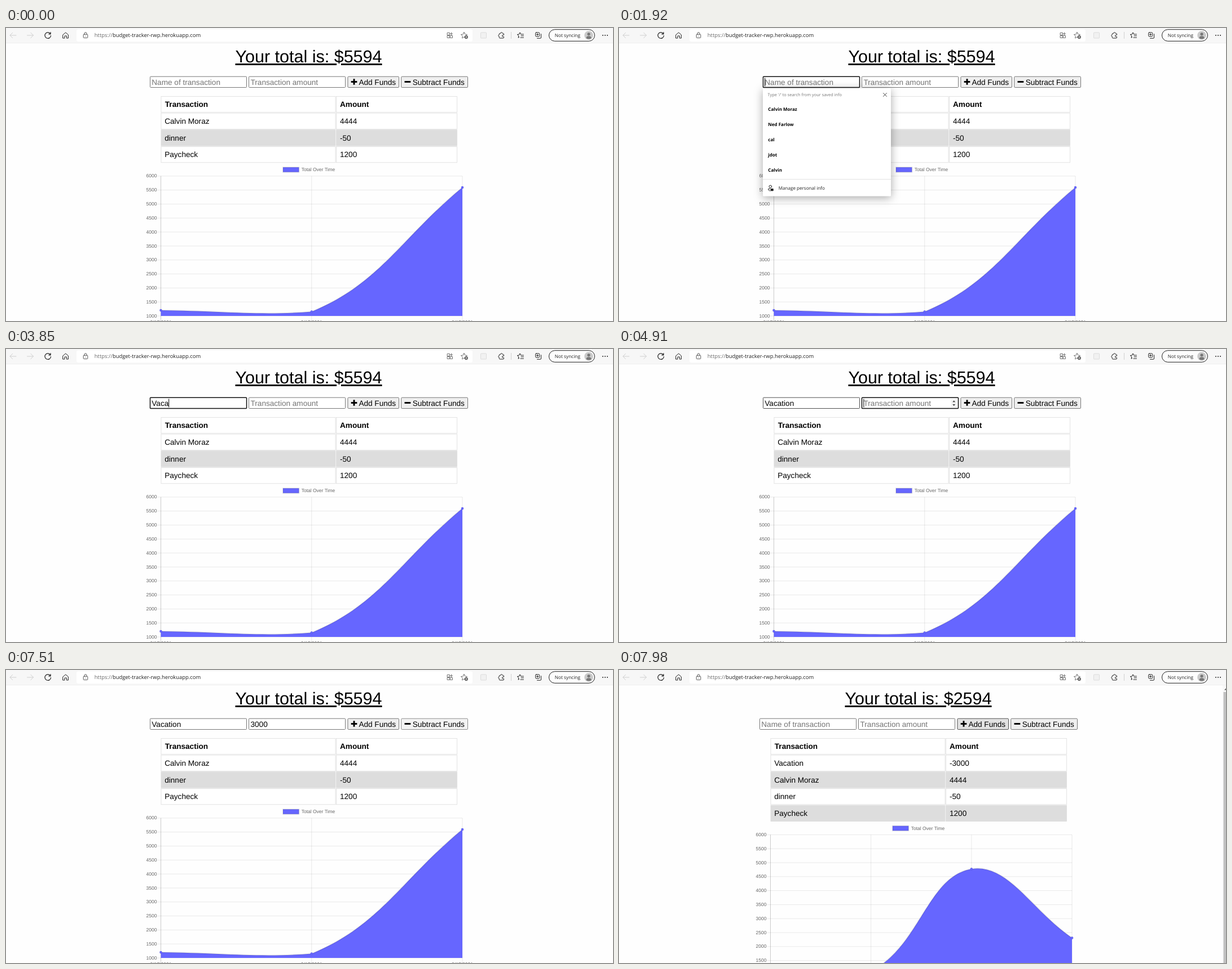
An HTML page for the animation above (8 s loop, 1076 px wide and 520 px high).

```html
<!DOCTYPE html>
<html lang="en">
<head>
<meta charset="utf-8">
<title>Budget tracker</title>
<style>
  html, body { margin: 0; width: 100%; height: 100%; overflow: hidden; background: #fefefe; }
  body { text-rendering: geometricPrecision; }
  svg { position: absolute; left: 0; top: 0; display: block; }
  text { font: 13.6px "Liberation Sans", Arial, sans-serif; white-space: pre; }
  h1 {
    position: absolute; left: 406.5px; top: 32.5px; margin: 0; white-space: nowrap;
    font: 30.5px/36px "Liberation Sans", Arial, sans-serif; text-decoration: underline;
  }
  .bold { font-weight: bold; }
  .ui text, .ui { font-family: "Open Sans", "Noto Sans", sans-serif; }
  .url { font-size: 9.41px; }
  .sync { font-size: 8.3px; }
  .tick { font-size: 8.5px; fill: #666; }
  .line { fill: none; stroke: #222; stroke-width: 1; stroke-linecap: round; stroke-linejoin: round; }
  .faint { stroke: #cfcfcf; }
  .grid { stroke: #000; stroke-opacity: .11; stroke-width: .8; }
  .grid.axis { stroke-opacity: .25; }
  .cell { fill: #fff; fill-opacity: .4; stroke: #ddd; stroke-width: .8; }
  .cell.even { fill: #ddd; fill-opacity: 1; }
  .area { fill: #66f; }
  .curve { fill: none; stroke: #000; stroke-opacity: .1; stroke-width: 2; }
  .dot { fill: #66f; stroke: #000; stroke-opacity: .1; stroke-width: .7; }
  .field rect { fill: #fff; stroke: #767676; stroke-width: 1; }
  .field.hover rect { stroke: #4f4f4f; }
  .field.focus rect { stroke: #101010; stroke-width: 1.5; }
  .field.empty text { fill: #757575; }
  .button rect { fill: #efefef; stroke: #767676; stroke-width: 1; }
  .button.hover rect { fill: #e2e2e2; stroke: #4f4f4f; }
  .button.active rect { fill: #f3f3f3; stroke: #8d8d8d; }
  #popup { transform-origin: 368.5px 199px; }
  #popup .panel { fill: #fff; filter: drop-shadow(0 3px 8px rgba(0, 0, 0, .34)); }
  #popup .hint { font-size: 7.4px; fill: #767676; }
  #popup .item { font-size: 8px; }
  #popup .manage { font-size: 8.08px; fill: #222; }
</style>
</head>
<body>
<svg id="stage" width="1076" height="520" viewBox="0 0 1076 520">
  <g id="before"></g>
  <g id="after" transform="translate(-6 0)"></g>

  <g id="form">
    <g id="name" class="field">
      <rect x="255.5" y="86.2" width="171" height="19.3" rx="1"/>
      <text x="258.3" y="101"></text>
    </g>
    <g id="amount" class="field">
      <rect x="430.5" y="86.2" width="171" height="19.3" rx="1"/>
      <text x="433.5" y="101"></text>
      <g id="spinner">
        <rect x="588.5" y="88.5" width="10.5" height="15" style="fill:#f3f3f3;stroke:none"/>
        <path d="M591.2 94.2h5l-2.5-3zM591.2 98h5l-2.5 3z" fill="#444"/>
      </g>
    </g>
    <g id="add" class="button">
      <rect x="605.9" y="86.2" width="90.6" height="19.3" rx="1.5"/>
      <path d="M617 90.3v10.4M611.7 95.5h10.6" stroke="#000" stroke-width="2.9"/>
      <text x="625.4" y="101">Add Funds</text>
    </g>
    <g id="subtract" class="button">
      <rect x="700.7" y="86.2" width="117.8" height="19.3" rx="1.5"/>
      <path d="M706.5 95.5h10.8" stroke="#000" stroke-width="2.9"/>
      <text x="720.7" y="101">Subtract Funds</text>
    </g>
    <path id="caret" stroke="#000" stroke-width="1"/>
  </g>

  <g id="popup" class="ui">
    <rect class="panel" x="255" y="107" width="227" height="191.5" rx="1.5"/>
    <text class="hint" x="263.6" y="121.3">Type '/' to search from your saved info</text>
    <path class="line" d="M468.6 115.6l5.8 5.8m0-5.8l-5.8 5.8" style="stroke-width:.9"/>
    <g id="items"></g>
    <path d="M255 268.5h227" stroke="#e2e2e2"/>
    <g class="line">
      <circle cx="268.3" cy="281.4" r="2.3"/>
      <path d="M268 285.4h-3.3q-.4 3.6 3.6 3.6"/>
    </g>
    <rect x="268.8" y="285" width="5" height="4.2" rx=".8" fill="#222"/>
    <text class="manage" x="282.8" y="287.2">Manage personal info</text>
  </g>

  <g id="scrollbar">
    <path d="M1070 27h6v493h-6z" fill="#f8f8f8"/>
    <path d="M1071.5 39h4.5v481h-4.5z" fill="#c1c1c1"/>
    <path d="M1073 35.5l3-3v3z" fill="#555"/>
  </g>

  <g id="toolbar" class="ui">
    <path d="M0 0h1076v27H0z" fill="#f7f7f7"/>
    <path d="M0 26.7h1076" stroke="#ebebeb" stroke-width=".6"/>
    <rect x="125" y="2.5" width="702" height="21.5" rx="3" fill="#fff"/>
    <path class="line faint" d="M18 13H7m4.6-4.6L7 13l4.6 4.6M37.5 13h11m-4.6-4.6l4.6 4.6l-4.6 4.6"/>
    <path class="line" d="M78.7 10.3A5.3 5.3 0 1 0 79.5 13.5M79 7.6v3.2h-3.2" style="stroke-width:1.2"/>
    <path class="line" d="M101 12l4.7-4l4.7 4v6h-3v-4h-3.4v4h-3z"/>
    <g class="line" style="stroke:#555">
      <rect x="137.2" y="11.3" width="7.6" height="6.2" rx="1"/>
      <path d="M139 11.3v-1.5a2 2 0 0 1 4 0v1.5M141 14.2v.4"/>
    </g>
    <text class="url" x="156.8" y="16.4" fill="#222"><tspan fill="#6b6b6b">https://</tspan>budget-tracker-rwp.herokuapp.com</text>
    <g class="line" style="stroke:#666;stroke-width:.9">
      <path d="M782.5 8.5h4v4h-4zM782.5 13.5h4v4h-4zM787.5 13.5h4v4h-4zM789.5 8v4.5m-2.2-2.25h4.4"/>
      <path d="M812 7.5l1.6 3.5l3.9.5l-2.9 2.6l.7 3.9l-3.3-1.9l-3.4 1.9l.7-3.9l-2.9-2.6l3.9-.5z"/>
    </g>
    <circle cx="815.8" cy="16" r="3.1" fill="#555"/>
    <path d="M815.8 14.3v3.4m-1.7-1.7h3.4" stroke="#fff" stroke-width=".8"/>
    <rect x="841.5" y="8" width="10" height="10" rx="1" fill="#f1f1f1" stroke="#dcdcdc"/>
    <path class="line" d="M875.5 9.5h1.2a1.7 1.7 0 0 1 3.4 0h1.2q1.2 0 1.2 1.2v1.6h-1.4a1.6 1.6 0 0 0 0 3.2h1.4v1.3q0 1.2-1.2 1.2h-5.800q-1.200 0-1.200-1.200v-1.800a1.500 1.500 0 0 1 0-3v-1.300q0-1.200 1.200-1.200z"/>
    <path d="M895.5 7v12" stroke="#d0d0d0"/>
    <path class="line" d="M909.8 16l-1.7 1.3l.6-3.6l-2.5-2.2l3.4-.4l1.5-3.2l1.5 3.2h4.9M913.2 13.8h4.3M912 17h5.5"/>
    <g class="line">
      <rect x="938.7" y="8" width="7" height="7" rx="1.2"/>
      <path d="M948.5 10.7v6.3q0 1.3-1.3 1.3h-5.7M942.2 9.8v3.4m-1.7-1.7h3.4"/>
    </g>
    <rect x="962.5" y="2.7" width="81" height="20.6" rx="10.3" fill="#fdfdfd" stroke="#222"/>
    <text class="sync" x="972.7" y="16" fill="#222">Not syncing</text>
    <circle cx="1033" cy="13" r="7.8" fill="#cacaca"/>
    <circle cx="1033" cy="10.8" r="2.6" fill="#777"/>
    <path d="M1028.5 18q0-3.7 4.5-3.7t4.5 3.7q-4.5 3-9 0" fill="#777"/>
    <g fill="#222"><circle cx="1058" cy="13" r="1"/><circle cx="1062" cy="13" r="1"/><circle cx="1066" cy="13" r="1"/></g>
  </g>
</svg>
<h1 id="total"></h1>

<script>
const LOOP = 8000, SUBMIT = 7680;
const $ = id => document.getElementById(id);

function add(parent, tag, attrs, content) {
  const el = document.createElementNS("http://www.w3.org/2000/svg", tag);
  for (const key in attrs) el.setAttribute(key, attrs[key]);
  if (content) el.textContent = content;
  return parent.appendChild(el);
}

function table(parent, rows) {
  [["Transaction", "Amount"], ...rows].forEach((row, i) => {
    const y = 121.4 + i * 29.7;
    const even = i && i % 2 === 0 ? " even" : "";
    add(parent, "rect", { class: "cell" + even, x: 275, y, width: 309, height: 28.3 });
    add(parent, "rect", { class: "cell" + even, x: 585.5, y, width: 214, height: 28.3 });
    row.forEach((word, col) => add(parent, "text", {
      class: i ? "" : "bold", x: col ? 592 : i ? 281.2 : 281.8, y: y + 18.7
    }, word));
  });
}

// Cubic spline with tension; control points stay inside the plot
function spline(pts, top, base) {
  const tension = 0.4;
  const cap = y => Math.min(base, Math.max(top, y));
  const handles = pts.map((p, i) => {
    const a = pts[i - 1] || p, b = pts[i + 1] || p;
    const d0 = Math.hypot(p.x - a.x, p.y - a.y), d1 = Math.hypot(b.x - p.x, b.y - p.y);
    const at = k => ({ x: p.x + k * (b.x - a.x), y: cap(p.y + k * (b.y - a.y)) });
    return { into: at(-tension * d0 / (d0 + d1)), out: at(tension * d1 / (d0 + d1)) };
  });
  return pts.slice(1).map((p, i) => [handles[i].out, handles[i + 1].into, p]);
}

function chart(parent, values, top) {
  const left = 274.5, right = 809, gap = 24.82, base = top + gap * 10;
  const dx = (right - left) / (values.length - 1);
  const pts = values.map((v, i) => ({ x: left + i * dx, y: base - (v - 1000) / 500 * gap }));
  const curves = spline(pts, top, base);

  add(parent, "rect", { x: 491, y: top - 15.6, width: 28.3, height: 8.5, fill: "#66f", stroke: "#000", "stroke-opacity": .1, "stroke-width": 2 });
  add(parent, "text", { class: "tick", x: 523.7, y: top - 8.6 }, "Total Over Time");
  for (let i = 0; i <= 10; i++) {
    const y = top + i * gap;
    add(parent, "path", { class: "grid", d: `M267.5 ${y}H${right}` });
    add(parent, "text", { class: "tick", x: 267.4, y: y + 2.6, "text-anchor": "end" }, String(6000 - i * 500));
  }
  pts.forEach((p, i) => {
    add(parent, "path", { class: i ? "grid" : "grid axis", d: `M${p.x} ${top}V${base + 7}` });
    add(parent, "text", { class: "tick", x: p.x, y: base + 14, "text-anchor": "middle" }, "3/17/2021");
  });
  const area = add(parent, "path", { class: "area" });
  const curve = add(parent, "path", { class: "curve" });
  const dots = pts.map(p => add(parent, "circle", { class: "dot", cx: p.x, r: 2.2 }));

  return grow => {
    const lift = y => base + (y - base) * grow;
    const xy = p => `${p.x} ${lift(p.y)}`;
    const d = `M${xy(pts[0])}` + curves.map(c => "C" + c.map(xy).join(" ")).join("");
    curve.setAttribute("d", d);
    area.setAttribute("d", `${d}V${base}H${left}Z`);
    dots.forEach((dot, i) => dot.setAttribute("cy", lift(pts[i].y)));
  };
}

const rows = [["Calvin Moraz", "4444"], ["dinner", "-50"], ["Paycheck", "1200"]];
table($("before"), rows);
table($("after"), [["Vacation", "-3000"], ...rows]);
chart($("before"), [1200, 1150, 5594], 262.8)(1);
const growChart = chart($("after"), [1200, 1150, 5594, 2594], 292.3);

["Calvin Moraz", "Ned Farlow", "cal", "jdot", "Calvin"].forEach((name, i) =>
  add($("items"), "text", { class: "item bold", x: 264.3, y: 146.9 + i * 27 }, name));

// Turns (time, value, time, value, ...) into a step function
const steps = (...list) => t => {
  let value = list[1];
  for (let i = 0; i < list.length && list[i] <= t; i += 2) value = list[i + 1];
  return value;
};
const typed = (word, ...times) => t => t >= 7750 ? "" : word.slice(0, times.filter(k => k <= t).length);

const nameText = typed("Vacation", 3290, 3450, 3680, 3850, 4060, 4230, 4300, 4380);
const amountText = typed("3000", 5440, 5670, 5750, 5900);
const nameState = steps(0, "", 1070, "hover", 1150, "", 1300, "hover", 1920, "focus", 4910, "hover", 6840, "");
const amountState = steps(0, "", 4910, "focus", 7510, "");
const addState = steps(0, "", 7900, "hover");
const subtractState = steps(0, "", 7210, "hover", 7510, "active", SUBMIT, "hover", 7900, "");
const caretOn = steps(0, 0, 1920, 1, 2450, 0, 2990, 1, 6450, 0, 6980, 1, 7510, 0);
const popupAlpha = steps(0, 0, 1920, 1, 3290, .68, 3380, .25, 3450, 0);
const chartTime = steps(0, 0, SUBMIT, 0, 7750, 70, 7830, 150, 7900, 220, 7980, 300);

const show = (el, on) => { el.style.display = on ? "" : "none"; };

function field(id, value, hint, state) {
  $(id).setAttribute("class", `field ${state} ${value ? "" : "empty"}`);
  $(id).querySelector("text").textContent = value || hint;
}

function render(t) {
  const done = t >= SUBMIT, shift = done ? -6 : 0;
  show($("before"), !done);
  show($("after"), done);
  show($("scrollbar"), done);
  $("form").setAttribute("transform", `translate(${shift} 0)`);
  $("total").style.transform = `translateX(${shift}px)`;
  $("total").textContent = `Your total is: $${done ? 2594 : 5594}`;

  const name = nameText(t), amount = amountText(t), onAmount = t >= 4910;
  field("name", name, "Name of transaction", nameState(t));
  field("amount", amount, "Transaction amount", amountState(t));
  show($("spinner"), amountState(t) === "focus");
  $("add").setAttribute("class", "button " + addState(t));
  $("subtract").setAttribute("class", "button " + subtractState(t));

  show($("caret"), caretOn(t));
  if (caretOn(t)) {
    const box = $(onAmount ? "amount" : "name").querySelector("text");
    const width = (onAmount ? amount : name) ? box.getComputedTextLength() : 0;
    $("caret").setAttribute("d", `M${+box.getAttribute("x") + width + .4} 88.5V103.5`);
  }

  const alpha = popupAlpha(t);
  show($("popup"), alpha);
  $("popup").style.opacity = alpha;
  $("popup").style.transform = `scale(${.944 + .056 * alpha})`;

  if (done) growChart(1 - Math.pow(1 - (.033 + chartTime(t) * .317 / 300), 4));
}

const start = performance.now();
function frame(now) {
  render(Math.max(0, now - start) % LOOP);
  requestAnimationFrame(frame);
}
render(0);
requestAnimationFrame(frame);
</script>
</body>
</html>
```
